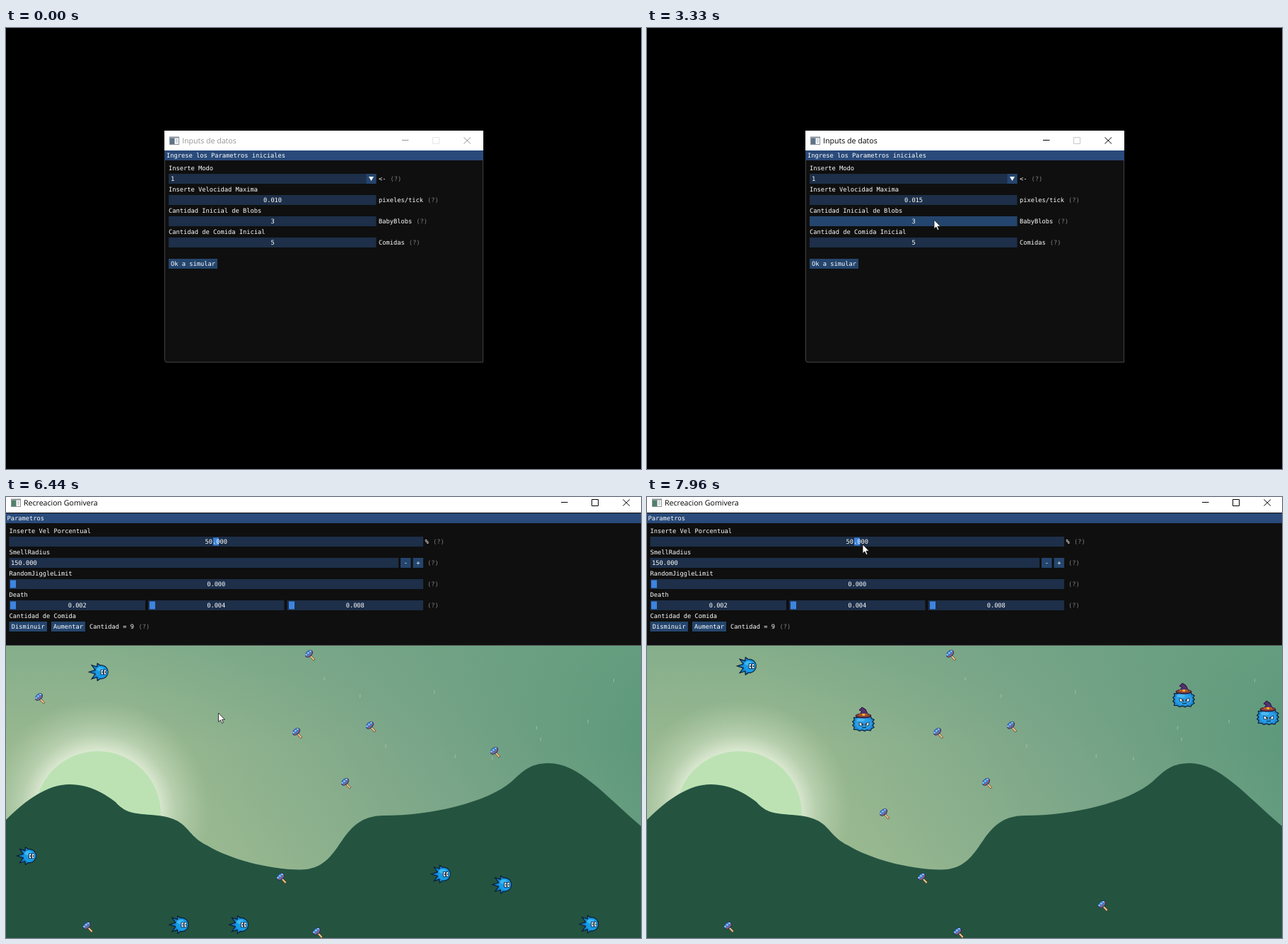
Recreate the animation shown at these times as an HTML page with a canvas. Size 898 by 623 pixels, loop 8000 ms.

```html
<!DOCTYPE html>
<html lang="es">
<head>
<meta charset="utf-8">
<title>Inputs de datos</title>
<style>
html, body { margin: 0; width: 100%; height: 100%; overflow: hidden; background: #000; }
canvas { display: block; }
</style>
</head>
<body>
<canvas id="stage" width="898" height="623"></canvas>
<script>
const ctx = document.getElementById('stage').getContext('2d');
const W = 898, H = 623, LOOP = 8000;
const MONO = '8.72px "DejaVu Sans Mono", monospace';
const SANS = '10.6px "Open Sans", sans-serif';
const PANEL = '#0f0f0f', BAR = '#294a7a', FIELD = '#1d2f49', HOVER = '#24456d',
  ACTIVE = '#3169ac', BRIGHT = '#4296fa', GRAB = '#3d85e0', GREY = '#808080',
  EDGE = '#424246', INK = '#0b1e38';

ctx.textRendering = 'geometricPrecision';

// ---------- helpers ----------
const ramp = (t, a, b) => Math.max(0, Math.min(1, (t - a) / (b - a)));
const smooth = u => u * u * (3 - 2 * u);
const mix = (a, b, u) => a + (b - a) * u;

// keys: [time, x, y]
function along(keys, t, ease) {
  const i = keys.findIndex(k => t < k[0]);
  if (i < 1) return keys[i ? keys.length - 1 : 0].slice(1);
  const [a, b] = [keys[i - 1], keys[i]];
  const u = ease(ramp(t, a[0], b[0]));
  return [mix(a[1], b[1], u), mix(a[2], b[2], u)];
}

function seeded(seed) {
  return () => (seed = seed * 16807 % 2147483647) / 2147483647;
}

function box(x, y, w, h, color) {
  ctx.fillStyle = color;
  ctx.fillRect(x, y, w, h);
}

function text(s, x, mid, color = '#fff', align = 'left', font = MONO) {
  ctx.font = font;
  ctx.textAlign = align;
  ctx.fillStyle = color;
  ctx.fillText(s, x, mid + 3);
}

function shape(path, fill, stroke, width = 1) {
  const p = new Path2D(path);
  if (fill) { ctx.fillStyle = fill; ctx.fill(p); }
  if (stroke) { ctx.strokeStyle = stroke; ctx.lineWidth = width; ctx.stroke(p); }
}

function line(x1, y1, x2, y2, color, width = 1) {
  shape(`M${x1},${y1}L${x2},${y2}`, null, color, width);
}

function oval(x, y, rx, ry, color, turn = 0) {
  ctx.fillStyle = color;
  ctx.beginPath();
  ctx.ellipse(x, y, rx, ry, turn, 0, 7);
  ctx.fill();
}

// Closed spiky outline; point(angle, odd) gives each corner.
function spiky(n, point, fill) {
  const pts = Array.from({ length: n }, (_, i) => point(i * 2 * Math.PI / n, i % 2));
  shape('M' + pts.join('L') + 'Z', fill, INK, 1.2);
}

function at(x, y, draw) {
  ctx.save();
  ctx.translate(x, y);
  draw();
  ctx.restore();
}

// ---------- window frame ----------
function titleBar(x, y, right, h, mid, title, tint, ink, maxInk) {
  box(x, y, right - x, h, '#fff');
  at(x + 7, mid - 5.5, () => {
    box(0, 0, 14, 11.5, '#8a9099');
    box(1, 2, 12, 8.5, '#fff');
    box(1, 2, 6.5, 8.5, tint);
    box(9, 3, 3, 6, '#d4d8dc');
  });
  text(title, x + 25, mid + 1, ink, 'left', SANS);
  at(right, mid, () => {
    line(-115, -.5, -105.5, -.5, ink);
    shape('M-71.5,-4.5h9v9h-9Z', null, maxInk);
    line(-27.5, -4.5, -18, 4.5, ink);
    line(-27.5, 4.5, -18, -4.5, ink);
  });
}

// ---------- input form ----------
const ROWS = [
  { label: 'Inserte Modo', unit: '<-' },
  { label: 'Inserte Velocidad Maxima', unit: 'pixeles/tick', from: .01, to: .015, digits: 3, drag: [2440, 2930] },
  { label: 'Cantidad Inicial de Blobs', unit: 'BabyBlobs', from: 3, to: 7, digits: 0, drag: [3870, 4420] },
  { label: 'Cantidad de Comida Inicial', unit: 'Comidas', from: 5, to: 9, digits: 0, drag: [4920, 5390] }
];

function drawRow(row, y, t, hot, popup) {
  const over = hot(230, y, 293.5, 14);
  text(row.label, 230, y - 8);
  text(row.unit, 527, y + 7);
  text('(?)', 533 + row.unit.length * 5.25, y + 7, GREY);
  if (row.drag) {
    const [a, b] = row.drag;
    const value = mix(row.from, row.to, ramp(t, a, b));
    box(230, y, 293.5, 14, t >= a && t < b ? ACTIVE : over ? HOVER : FIELD);
    text(value.toFixed(row.digits), 377, y + 7, '#fff', 'center');
  } else {
    box(230, y, 293.5, 14, over ? HOVER : FIELD);
    box(509.5, y, 14, 14, over || popup ? BRIGHT : HOVER);
    shape(`M513,${y + 4}h7l-3.5,6Z`, '#fff');
    text('1', 233, y + 7);
  }
}

function drawPopup(mouseY) {
  box(230, 221, 293.5, 33, 'rgba(20,20,20,.94)');
  shape('M230.5,221.5h293v32.5h-293Z', null, '#414147');
  ['1', '2'].forEach((s, i) => {
    const y = 225 + 13 * i;
    const over = mouseY >= y && mouseY < y + 13;
    const tint = over ? .8 : i ? 0 : .31;
    box(231, y, 291.5, 12.5, `rgba(66,150,250,${tint})`);
    text(s, 233, y + 6);
  });
}

function drawForm(t, [mx, my]) {
  const focus = t >= 680;
  const popup = t >= 730 && t < 1850;
  const hot = (x, y, w, h) => focus && !popup && mx >= x && mx < x + w && my >= y && my < y + h;
  const gone = ramp(t, 6170, 6270);
  const size = 1 - .1 * gone;

  ctx.save();
  ctx.globalAlpha = 1 - gone;
  ctx.translate(449.5, 309);
  ctx.scale(size, size);
  ctx.translate(-449.5, -309);

  box(224, 145, 451, 328, PANEL);
  shape('M224.5,173V468Q224.5,472 229,472H674.5V173', null, EDGE);
  titleBar(224, 145, 675, 28, 159, 'Inputs de datos', '#5f7488',
    focus ? '#000' : '#969696', focus ? '#c8c8c8' : '#e6e6e6');
  box(224.5, 173, 450.5, 14, BAR);
  text('Ingrese los Parametros iniciales', 227, 180);
  ROWS.forEach((row, i) => drawRow(row, 206 + 30 * i, t, hot, popup));
  box(230, 326, 69, 14, hot(230, 326, 69, 14) ? BRIGHT : HOVER);
  text('Ok a simular', 233, 333);
  if (popup) drawPopup(my);
  ctx.restore();
}

// ---------- simulation panel ----------
function slider(x, y, w, value, grab) {
  box(x, y, w, 14, FIELD);
  box(grab, y + 1.5, 8, 11, GRAB);
  text(value, x + w / 2, y + 7, '#fff', 'center');
}

function button(x, y, w, label) {
  box(x, y, w, 14, HOVER);
  text(label, x + w / 2, y + 7, '#fff', 'center');
}

function simTitle() {
  titleBar(0, -6, 900, 28, 8, 'Recreacion Gomivera', '#4f8268', '#000', '#000');
}

function drawPanel() {
  box(0, 0, W, 210, PANEL);
  simTitle();
  box(0, 23, W, 14, BAR);
  line(0, 209.5, W, 209.5, EDGE);
  text('Parametros', 1.5, 30);
  ['Inserte Vel Porcentual', 'SmellRadius', 'RandomJiggleLimit', 'Death', 'Cantidad de Comida']
    .forEach((s, i) => text(s, 4.5, 48 + 30 * i));
  slider(4.5, 56, 585.5, '50.000', 293);
  text('%', 592.5, 63);
  text('(?)', 604, 63, GREY);
  box(4.5, 86, 550.5, 14, FIELD);
  text('150.000', 7, 93);
  button(558, 86, 14.5, '-');
  button(575.5, 86, 14.5, '+');
  slider(4.5, 116, 585.5, '0.000', 6);
  ['0.002', '0.004', '0.008'].forEach((s, i) => slider(4.5 + 196.5 * i, 146, 192.5, s, 6 + 197 * i));
  for (let y = 93; y <= 153; y += 30) text('(?)', 596, y, GREY);
  button(4.5, 176, 53.5, 'Disminuir');
  button(64, 176, 48, 'Aumentar');
  text('Cantidad = 9', 118, 183);
  text('(?)', 187.5, 183, GREY);
}

// ---------- landscape ----------
const HILLS = `M0,623V456C30,426 60,406 90,406S142,421 155,431C168,446 180,447 205,449
  C262,453 250,475 284,492C315,511 370,526 415,526.5C480,527 465,450 535,450
  C600,450 680,432 715,402C728,390 740,376 767,376C810,376 845,420 898,465V623Z`;

function drawLand() {
  const sky = ctx.createLinearGradient(870, 200, 330, 540);
  sky.addColorStop(0, '#589679');
  sky.addColorStop(.5, '#7aa588');
  sky.addColorStop(1, '#98b890');
  box(0, 210, W, H - 210, sky);
  const dusk = ctx.createLinearGradient(0, 210, 0, 350);
  dusk.addColorStop(0, 'rgba(114,164,134,.5)');
  dusk.addColorStop(1, 'rgba(114,164,134,0)');
  box(0, 210, W, 140, dusk);

  const glow = ctx.createRadialGradient(130, 444, 84, 130, 444, 158);
  glow.addColorStop(0, 'rgba(238,246,228,.8)');
  glow.addColorStop(.35, 'rgba(228,240,216,.4)');
  glow.addColorStop(1, 'rgba(200,222,190,0)');
  box(0, 270, 300, 260, glow);
  oval(130, 448, 89, 89, '#bce2b4');

  const rnd = seeded(77);
  for (let i = 0; i < 10; i++) {
    const x = 450 + 43 * (i + rnd()), y = 240 + 130 * rnd();
    line(x, y - 2.5, x, y + 2.5, 'rgba(200,225,195,.5)');
  }
  shape(HILLS, '#245440');
}

// ---------- creatures ----------
function food(x, y) {
  at(x, y, () => {
    line(0, 0, 6, 6.5, '#5a3a28', 3.2);
    line(0, 0, 5.6, 6, '#f0c486', 1.9);
    oval(-1.5, -2.5, 6.3, 4.3, '#2b2a58', -.7);
    oval(-1.7, -2.7, 5.5, 3.6, '#3c7cd0', -.7);
    for (let i = -1; i <= 1; i++) {
      oval(-2.6 + 3 * i, -3.6 - 2.4 * i, 1.3, 1.1, '#a8d8f6');
      oval(-.4 + 2.5 * i, -1.2 - 2.2 * i, 1.1, 1, '#cc4a34');
    }
  });
}

function baby(x, y) {
  at(x, y, () => {
    spiky(22, (a, odd) => {
      const back = Math.max(0, -Math.cos(a));
      const r = 9.6 + back * (odd ? 7.5 : -1);
      return [2.5 + r * Math.cos(a), r * (1 + .15 * back) * Math.sin(a)];
    }, '#1480cc');
    oval(3, 0, 8.6, 8.6, '#169be4');
    oval(1, -4, 5, 3, '#38b8f4');
    for (const ex of [3.6, 7.8]) {
      box(ex - 1.9, -3.6, 3.8, 7.6, INK);
      box(ex - 1, -2.8, 2.4, 6, '#fff');
      box(ex + .1, -1, 1.1, 2.4, '#222');
    }
  });
}

function wizard(x, y) {
  at(x, y, () => {
    spiky(26, (a, odd) => {
      const c = Math.cos(a), s = Math.sin(a);
      const r = (odd ? 13 : 15.3) / (c ** 4 + s ** 4) ** .25;
      return [r * c, 5 + .7 * r * s];
    }, '#1f8cd6');
    oval(0, 5, 11.5, 8, '#2a9fe6');
    oval(-4, 0, 6, 2.5, '#4ab8f2');
    for (const side of [-1, 1]) {
      shape(`M${1 + 7 * side},3L${1 + 1.5 * side},5.5v2.5h${5 * side}Z`, '#fff', INK, .8);
      box(.3 + 3 * side, 5.2, 1.5, 2, '#111');
    }
    line(-2, 11, 4, 10.5, INK);
    oval(0, -6, 11.5, 3.6, '#2a1430');
    oval(0, -6.3, 10.3, 2.5, '#84423c');
    shape('M-7,-7L-2,-12L-6,-14L-2,-18L3,-15L7,-7Z', '#553072', '#24122e');
    shape('M-6,-9L6,-9L7,-6H-7Z', '#b5552a');
    box(-1.5, -9, 3.5, 3, '#f0b830');
  });
}

// ---------- simulation ----------
const T0 = 6940, OPEN = 6440, FIRST = 6760, EAT = 7110, MEET = 7390, WRAP = 7700;
const FOOD = [[430, 224], [412, 334], [516, 325], [481, 405], [390, 539], [116, 608], [441, 616]];

// Straight walk through (x, y) at T0 towards a goal reached at time t1.
const walk = (x, y, gx, gy, t1) => t => {
  const u = (t - T0) / (t1 - T0);
  return [mix(x, gx, u), mix(y, gy, u)];
};
const BABIES = [
  { pos: walk(71, 284, -22, 340, WRAP), end: WRAP },
  { pos: walk(67, 419, 142, 239, 7960), end: LOOP },
  { pos: walk(655, 444, 690, 364, MEET), end: MEET },
  { pos: walk(697, 450, 692, 362, MEET), end: MEET },
  { pos: walk(844, 503, 872, 350, WRAP), end: WRAP }
];
const WIZARDS = [
  [[FIRST, 288, 585], [T0, 284, 533], [7720, 268, 309], [7960, 306, 315]],
  [[MEET, 691, 363], [7960, 759, 281]],
  [[WRAP, 872, 352], [7960, 878, 306]]
];

function drawScene(t) {
  drawLand();
  FOOD.forEach(p => food(...p));
  food(...(t < EAT ? [48, 285] : [336, 448]));
  food(...(t < MEET ? [692, 361] : [645, 578]));
  for (const { pos, end } of BABIES) {
    if (t >= end) continue;
    const [x, y] = pos(t);
    baby(x, y);
    if (x < 16) baby(x + W, y);
  }
  if (t < FIRST) {
    const gap = (FIRST - t) * .12;
    baby(284 - gap, 585 + gap / 2);
    baby(292 + gap, 585 + gap / 2);
  }
  for (const path of WIZARDS) if (t >= path[0][0]) wizard(...along(path, t, u => u));
  drawPanel();
}

function drawSim(t) {
  ctx.save();
  ctx.globalAlpha = smooth(ramp(t, 6300, 6400));
  if (t >= OPEN) drawScene(t);
  else simTitle();
  ctx.restore();
}

// ---------- pointer ----------
const MOUSE = [[30, 664, 265], [180, 362, 212], [1130, 362, 212], [1330, 496, 238],
  [1480, 494, 222.5], [1680, 497, 228], [2110, 497, 228], [2310, 428, 238], [2460, 428, 238],
  [2910, 490, 229], [3060, 490, 229], [3330, 406, 271], [3880, 390, 268], [4150, 450, 257],
  [4430, 514, 268], [4580, 514, 268], [4900, 412, 303], [5470, 500, 308], [6010, 296, 333],
  [6270, 296, 333], [6920, 322, 170], [7200, 322, 170], [7660, 322, 88], [7950, 305, 67]];

function drawMouse([x, y]) {
  at(x, y, () => shape('M0,0V12.6L2.9,10L4.9,14.6L6.9,13.7L4.9,9.3H8.9Z', '#fff', '#111', .8));
}

function draw(t) {
  box(0, 0, W, H, '#000');
  const mouse = along(MOUSE, t, smooth);
  if (t < 6270) drawForm(t, mouse);
  if (t > 6300) drawSim(t);
  if (t >= 30) drawMouse(mouse);
}

function tick() {
  draw(performance.now() % LOOP);
  requestAnimationFrame(tick);
}
tick();
</script>
</body>
</html>
```
